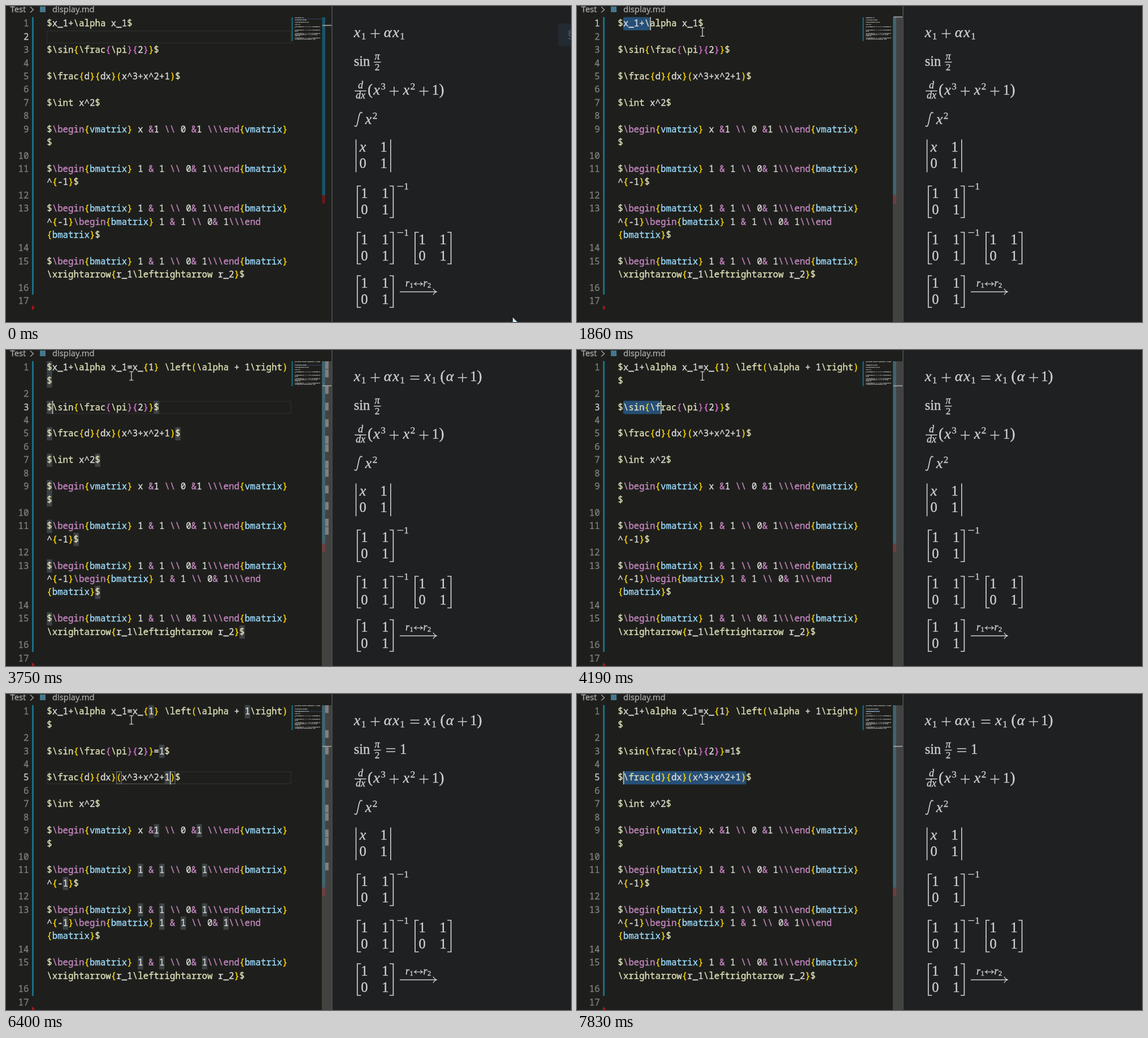
Write an HTML page with a canvas that moves like this. It is 1000 px wide and 560 px high and loops after 8 s.

```html
<!DOCTYPE html>
<html lang="en">
<head>
<meta charset="utf-8">
<title>Formula editor</title>
<style>
html, body { margin: 0; width: 100%; height: 100%; overflow: hidden; background: #1e1f1c; }
canvas { display: block; width: 1000px; height: 560px; }
</style>
</head>
<body>
<canvas id="stage" width="1000" height="560"></canvas>
<script>
const g = document.getElementById('stage').getContext('2d');
const LOOP = 8000;
const X0 = 72.2, Y0 = 19.7, CW = 9.47, RH = 23.42;
const MONO = '"Noto Sans Mono", monospace';
const SERIF = '"Liberation Serif", serif';
const BLUE = '#1b6f88', INK = '#d0d1d0';
const BRACKETS = ['#ffd700', '#da70d6', '#179fff'];

// "\n" marks a soft wrap inside one line
const B = String.raw`$\begin{bmatrix} 1 & 1 \\ 0& 1\\\end{bmatrix}` + '\n';
const BASE = [
  String.raw`$x_1+\alpha x_1$`, '',
  String.raw`$\sin{\frac{\pi}{2}}$`, '',
  String.raw`$\frac{d}{dx}(x^3+x^2+1)$`, '',
  String.raw`$\int x^2$`, '',
  String.raw`$\begin{vmatrix} x &1 \\ 0 &1 \\\end{vmatrix}` + '\n$', '',
  B + '^{-1}$', '',
  B + String.raw`^{-1}\begin{bmatrix} 1 & 1 \\ 0& 1\\\end` + '\n{bmatrix}$', '',
  B + String.raw`\xrightarrow{r_1\leftrightarrow r_2}$`, '', ''
];
const FACTORED = String.raw`$x_1+\alpha x_1=x_{1} \left(\alpha + 1\right)` + '\n$';
const SOLVED = String.raw`$\sin{\frac{\pi}{2}}=1$`;

function colours(text) {
  const out = [];
  let depth = 0, env = false;
  for (const tok of text.match(/\\\\|\\[a-z]+|[a-z]+|[^]/g) || []) {
    let c = '#dadad8';
    if (tok === '\\\\' || tok === '&') c = '#c586c0';
    else if (/^\\(begin|end)$/.test(tok)) { c = '#c586c0'; env = true; }
    else if (tok[0] === '\\' || tok === '$') c = '#dfdfb8';
    else if (/[{(]/.test(tok)) c = BRACKETS[depth++ % 3];
    else if (/[})]/.test(tok)) { c = BRACKETS[--depth % 3]; env = false; }
    else if (env) c = '#9cdcfe';
    for (const ch of tok) out.push(c);
  }
  return out;
}

function layout(lines) {
  const rows = [];
  lines.forEach((src, line) => {
    const tint = colours(src.replace(/\n/g, ''));
    let start = 0;
    for (const text of src.split('\n')) {
      rows.push({ line, start, text, tint: tint.slice(start, start + text.length) });
      start += text.length;
    }
  });
  return rows;
}

const edit = (a, b) => layout(BASE.map((s, i) => i === 0 && a ? a : i === 2 && b ? b : s));
const DOCS = [edit(), edit(FACTORED), edit(FACTORED, SOLVED)];

// Each step changes part of the state from its time on
const steps = [
  [0, { doc: 0, pre: 0, line: 1, col: 0, from: null, caret: false, hover: false,
        hl: null, match: null, glide: null, dim: false, mouse: [897, 552] }],
  [100, { mouse: [606, 341] }],
  [310, { mouse: [430, 206], hover: true }],
  [420, { mouse: [322, 126] }],
  [530, { mouse: [256, 78] }],
  [640, { mouse: [230, 56] }],
  [750, { mouse: [222, 50] }],
  [970, { mouse: [231, 40], caret: true }],
  [1070, { mouse: [222, 46] }],
  [1300, { line: 0 }],
  [1410, { col: 1 }],
  [1520, { from: 1, col: 2 }],
  [2510, { caret: false }],
  [2730, { doc: 1, col: 45, caret: true, glide: [114, 36.3], dim: true }],
  [2840, { glide: null }],
  [2950, { pre: 1 }],
  [3170, { from: null, dim: false }],
  [3290, { line: 1, col: 0 }],
  [3510, { line: 2 }],
  [3620, { col: 1 }],
  [3750, { hl: /\$/ }],
  [3860, { hl: null, from: 1, col: 2 }],
  [5520, { doc: 2, col: 22 }],
  [5630, { pre: 2 }],
  [5740, { from: null }],
  [5960, { hl: /(?<!\w)1(?!\w)/ }],
  [6190, { col: 23 }],
  [6300, { line: 3, col: 0 }],
  [6400, { line: 4, col: 23, match: [13, 23] }],
  [6510, { col: 24, hl: null }],
  [6620, { match: null, from: 24, col: 23 }],
  [7610, { caret: false }],
  [7720, { caret: true }],
  [7830, { col: 1 }]
];
const runCols = (times, cols) => times.forEach((t, i) => steps.push([t, { col: cols[i] }]));
runCols([1630, 1740, 1860, 1970, 2080], [3, 4, 6, 10, 15]);
runCols([3970, 4080, 4190, 4310, 4430, 4530, 4640, 4750, 4970, 5070],
        [3, 5, 8, 11, 13, 14, 15, 16, 18, 20]);
runCols([6730, 6840, 6950, 7060, 7280], [19, 13, 7, 2, 0]);
steps.sort((a, b) => a[0] - b[0]);

const stateAt = t => Object.assign({}, ...steps.filter(s => s[0] <= t).map(s => s[1]));

function rect(x, y, w, h, c) { g.fillStyle = c; g.fillRect(x, y, w, h); }

function path(points, width = 1.5, c = INK) {
  g.strokeStyle = c;
  g.lineWidth = width;
  g.beginPath();
  points.forEach(([x, y], i) => i ? g.lineTo(x, y) : g.moveTo(x, y));
  g.stroke();
}

// A hairline outline gives the text its slightly heavy weight
function label(s, x, y, font, c, align = 'left') {
  g.font = font;
  g.fillStyle = g.strokeStyle = c;
  g.lineWidth = .35;
  g.textAlign = align;
  g.fillText(s, x, y);
  g.strokeText(s, x, y);
}

// ---- editor ----
function header() {
  const font = '14.8px "Open Sans", sans-serif';
  label('Test', 7.5, 11.3, font, '#a9a9a7');
  path([[43, 1.5], [48.5, 6.5], [43, 11.5]], 1.3, '#a9a9a7');
  rect(60, 1, 10, 10, '#46788f');
  label('display.md', 82, 11.3, font, '#a9a9a7');
}

function editor(s) {
  const rows = DOCS[s.doc];
  const top = r => Y0 + r * RH;
  let cur = 0;
  rows.forEach((r, i) => { if (r.line === s.line && r.start <= s.col) cur = i; });
  const marks = [];
  const sel = s.from === null ? null : [Math.min(s.from, s.col), Math.max(s.from, s.col)];
  const span = r => sel && r.line === s.line
    ? [Math.max(sel[0] - r.start, 0), Math.min(sel[1] - r.start, r.text.length)] : [0, 0];

  if (!sel) {
    g.strokeStyle = '#2b2c29';
    g.lineWidth = 1.6;
    g.strokeRect(72.5, top(cur) + 1, 431.5, RH - 2);
  }
  rows.forEach((r, i) => {
    const y = top(i), base = y + 16.6;
    if (s.hl) {
      for (const m of r.text.matchAll(new RegExp(s.hl, 'g'))) {
        rect(X0 + m.index * CW, y, CW, RH, '#3d4244');
        if (!marks.includes(i)) marks.push(i);
      }
    }
    const [a, b] = span(r);
    if (b > a) {
      g.fillStyle = '#264f78';
      g.beginPath();
      g.roundRect(X0 + a * CW, y, (b - a) * CW, RH, 3);
      g.fill();
    }
    if (s.match && r.line === s.line) {
      g.strokeStyle = '#888';
      g.lineWidth = 1;
      s.match.forEach(c => g.strokeRect(X0 + c * CW + .5, y + 1, CW - 1, RH - 2));
      path([[X0 + s.match[0] * CW, y + RH - 1], [X0 + 24 * CW, y + RH - 1]], 1, '#55554f');
    }
    [...r.text].forEach((ch, c) => {
      if (ch !== ' ') label(ch, X0 + c * CW, base, '15.78px ' + MONO, r.tint[c]);
      else if (c >= a && c < b) rect(X0 + (c + .5) * CW - 1, y + 11, 2, 2, '#6f8ba6');
    });
    if (!r.start) {
      const on = r.line === s.line && !s.dim;
      label(r.line + 1, 40.5, base, '15.78px ' + MONO, on ? '#c6c6c6' : '#7d7e7a', 'right');
    }
  });

  const end = top(rows.length - 1);
  rect(46, Y0, 3, end - Y0, BLUE);
  g.fillStyle = '#a3161d';
  g.beginPath();
  g.moveTo(46, end + 18.5);
  g.lineTo(51, end + 23.2);
  g.lineTo(46, end + 28);
  g.fill();

  if (s.caret) {
    const [x, y] = s.glide || [X0 + (s.col - rows[cur].start) * CW, top(cur)];
    rect(x, y, 1.7, RH, '#c0c0be');
  }
  minimap(rows, s, cur, sel, span);
  ruler(rows.length, cur, marks, s.hover);
}

function minimap(rows, s, cur, sel, span) {
  rect(505.5, 20, 2, rows.length * 2 - 2, BLUE);
  if (!sel) rect(510, 20 + cur * 2, 50, 2, '#29303f');
  rows.forEach((r, i) => {
    const [a, b] = span(r), y = 20 + i * 2;
    if (b > a) rect(511 + a, y, b - a, 2, '#264f78');
    [...r.text].forEach((ch, c) => {
      if (ch === ' ') return;
      g.globalAlpha = .4 + (ch.charCodeAt(0) % 7) * .06;
      rect(511 + c, y, 1, 1.4, '#d4d4d4');
    });
    g.globalAlpha = 1;
  });
}

function ruler(count, cur, marks, hover) {
  const pitch = count > 22 ? 14.68 : 15;
  const split = 20 + (count - 1) * pitch;
  rect(559.5, 20, 5.5, split - 20, '#17566a');
  rect(559.5, split, 5.5, pitch, '#66181d');
  if (hover) rect(559, 20, 18, 540, 'rgba(121,121,121,.4)');
  marks.forEach(r => rect(565, 20 + r * pitch, 6, pitch - 1, '#7f7f7e'));
  rect(560, 18.5 + cur * pitch, 17, 1.8, '#a0a0a0');
}

// ---- preview ----
const main = (s, x, y, size = 24.4) => label(s, x, y, size + 'px ' + SERIF, INK, 'center');
const ital = (s, x, y, size = 26) => label(s, x, y, 'italic ' + size + 'px ' + SERIF, INK, 'center');
const small = (s, x, y) => main(s, x, y, 17);
const paren = (s, x, y) => main(s, x, y, 27);

function plus(x, y) {
  path([[x - 8, y - 6], [x + 8, y - 6]]);
  path([[x, y - 14], [x, y + 2]]);
}
function equals(x, y) {
  path([[x - 8, y - 8.7], [x + 8, y - 8.7]]);
  path([[x - 8, y - 3.3], [x + 8, y - 3.3]]);
}
function xSub(x, y) {
  ital('x', x, y);
  small('1', x + 11.5, y + 3.5);
}
function xSup(x, y, n) {
  ital('x', x, y);
  small(n, x + 11.5, y - 9);
}
function cells(x, y, first = '1') {
  if (first === 'x') ital('x', x, y + 22); else main(first, x, y + 22);
  main('1', x + 37, y + 22);
  main('0', x, y + 51);
  main('1', x + 37, y + 51);
}
function bmatrix(x, y) {
  const right = x + 63.6;
  path([[x + 6.5, y], [x, y], [x, y + 56], [x + 6.5, y + 56]], 1.7);
  path([[right - 6.5, y], [right, y], [right, y + 56], [right - 6.5, y + 56]], 1.7);
  cells(x + 12.5, y - 1);
}
function inverse(y) {
  path([[692.5, y], [703, y]], 1.3);
  small('1', 708.5, y + 5.5);
}
function head(x, y, dx, dy) {
  g.lineWidth = 1.2;
  g.beginPath();
  g.moveTo(x - dx, y - dy);
  g.quadraticCurveTo(x - dx * .6, y - dy * .2, x, y);
  g.quadraticCurveTo(x - dx * .6, y + dy * .2, x - dx, y + dy);
  g.stroke();
}

function preview(level) {
  rect(578, 0, 422, 560, '#1e2022');
  rect(576, 0, 2, 560, '#454647');

  xSub(621.5, 55.2);
  plus(653.5, 55);
  ital('α', 675.5, 55.2);
  xSub(690, 55.2);
  if (level > 0) {
    equals(723.5, 55);
    xSub(746, 55.2);
    paren('(', 773, 55);
    ital('α', 785.5, 55.2);
    plus(808, 55);
    main('1', 827.5, 55.2);
    paren(')', 838, 55);
  }

  main('sin', 630, 105.5);
  ital('π', 657, 95, 18);
  path([[651, 99.5], [663.5, 99.5]]);
  small('2', 657, 113.5);
  if (level > 1) {
    equals(681, 105.5);
    main('1', 703, 105.5);
  }

  ital('d', 627.5, 146, 18);
  path([[617, 150.5], [637.5, 150.5]]);
  ital('dx', 627.5, 164, 18);
  paren('(', 644.5, 157);
  xSup(656, 157, '3');
  plus(687, 157);
  xSup(708.5, 157, '2');
  plus(739.5, 157);
  main('1', 760, 157);
  paren(')', 771, 157);

  g.strokeStyle = INK;
  g.lineWidth = 1.7;
  g.beginPath();
  g.moveTo(616.5, 212);
  g.bezierCurveTo(621, 217, 622, 208, 623.5, 201);
  g.bezierCurveTo(625, 193, 627, 185, 630.5, 190);
  g.stroke();
  xSup(641.5, 209, '2');

  path([[619.5, 236.5], [619.5, 294.5]], 1.6);
  path([[680.8, 236.5], [680.8, 294.5]], 1.6);
  cells(631.5, 236, 'x');

  bmatrix(621.8, 319);
  inverse(319.5);
  bmatrix(621.8, 401);
  inverse(401.5);
  bmatrix(724, 401);
  bmatrix(621.8, 478);

  path([[697, 506.5], [762, 506.5]], 1.4);
  head(762, 506.5, 6, 5.5);
  ital('r', 710.5, 497, 18);
  main('1', 717.5, 499, 12.5);
  path([[723, 492.5], [737, 492.5]], 1.2);
  head(737.5, 492.5, 4, 3.5);
  head(722.5, 492.5, -4, 3.5);
  ital('r', 742, 497, 18);
  main('2', 749, 499, 12.5);
}

function button() {
  g.fillStyle = '#232a31';
  g.beginPath();
  g.roundRect(977, 31, 40, 40, 4);
  g.fill();
  label('§', 1000, 59, '22px "Open Sans", sans-serif', '#4b5a66', 'center');
}

function pointer([x, y], inEditor) {
  if (inEditor) {
    path([[x, y - 7], [x, y + 7]], 1.3, '#d8d8d6');
    path([[x - 3.5, y - 7.5], [x + 3.5, y - 7.5]], 1.2, '#d8d8d6');
    path([[x - 3.5, y + 7.5], [x + 3.5, y + 7.5]], 1.2, '#d8d8d6');
    return;
  }
  g.fillStyle = '#c9eef8';
  g.beginPath();
  for (const [dx, dy] of [[0, 0], [0, 16], [4, 12.5], [7, 19], [9.5, 18], [6.8, 11.5], [11.5, 11.5]])
    g.lineTo(x + dx, y + dy);
  g.fill();
}

function draw(now) {
  const s = stateAt(now % LOOP);
  rect(0, 0, 1000, 560, '#1e1f1c');
  header();
  editor(s);
  preview(s.pre);
  if (!s.hover) button();
  pointer(s.mouse, s.hover);
}

const begin = performance.now();
function tick() {
  draw(performance.now() - begin);
  requestAnimationFrame(tick);
}
tick();
</script>
</body>
</html>
```
